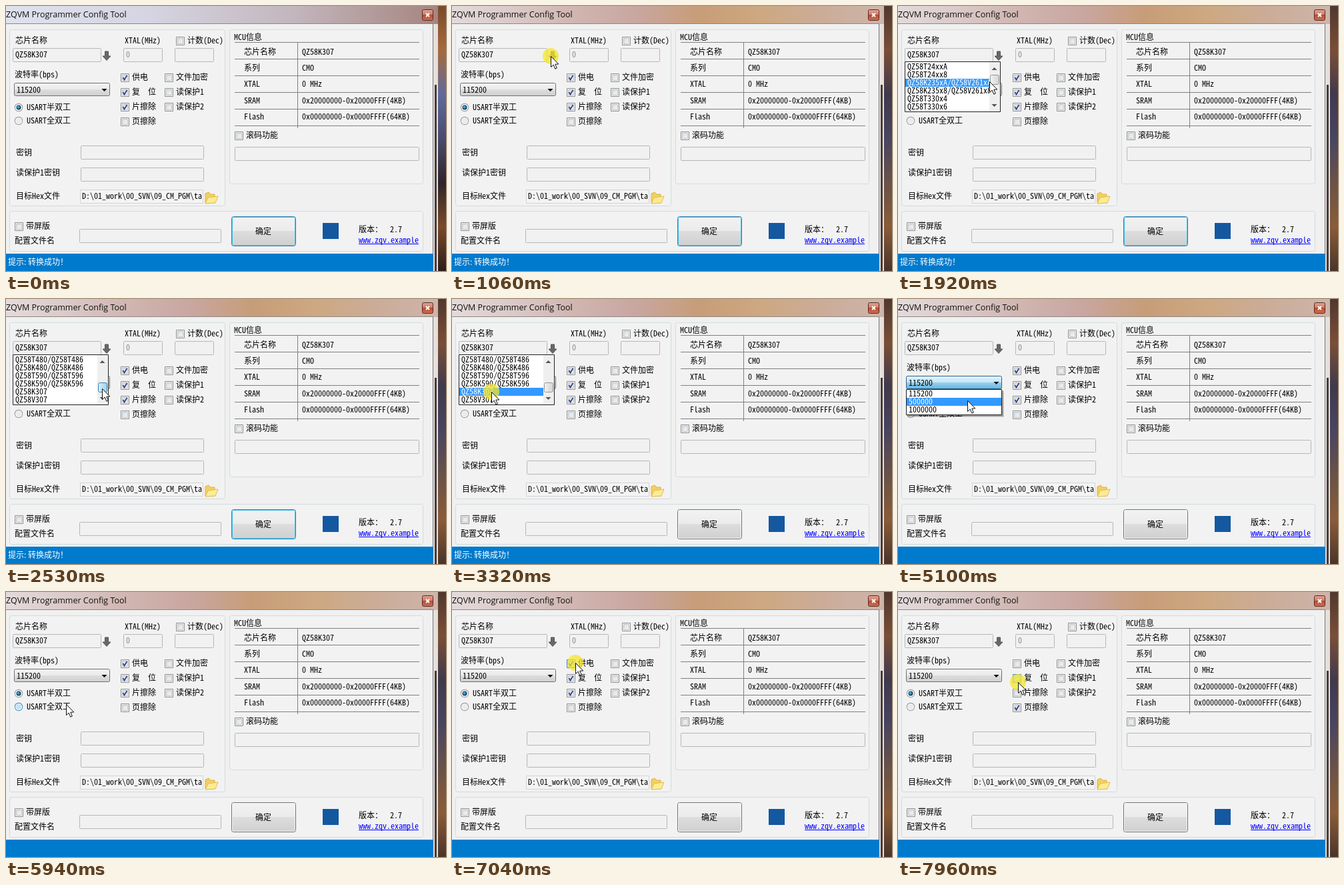
Recreate the animation shown at these times as an HTML page with a canvas. Size 660 by 397 pixels, loop 8000 ms.

```html
<!DOCTYPE html>
<html lang="zh-CN">
<head>
<meta charset="utf-8">
<style>
html, body { margin: 0; width: 660px; height: 397px; overflow: hidden; background: #f0f0f0 }
canvas { display: block }
</style>
</head>
<body>
<canvas id="stage" width="660" height="397"></canvas>
<script>
const ctx = document.getElementById('stage').getContext('2d');
const LOOP = 8000, PRESS = 150, ROW = 12;
const MONO = '12px "Noto Sans Mono CJK SC", "Noto Sans CJK SC", monospace';
const CHIP = 'QZ58K307';
const CHIPS = [
  ...['A', '8'].map(s => `QZ58T24xx${s}`),
  ...['A', '8'].map(s => `QZ58K235x${s}/QZ58V261x${s}`),
  ...['T', 'K'].flatMap(k => ['x4', 'x6', ''].map(s => `QZ58${k}330${s}`)),
  ...['48', '59'].flatMap(n => ['T', 'K'].map(k => `QZ58${k}${n}0/QZ58${k}${n}6`)),
  CHIP, 'QZ58V307'];
const RATES = ['115200', '500000', '1000000'];

// Pointer stops; travel time follows from the distance
const STOPS = [
  { at: 360, x: 330, y: 410 },
  { at: 980, x: 148, y: 75, press: 1060 },
  { at: 1920, x: 137, y: 113 },
  { at: 2100, x: 144, y: 113, press: 2230 },
  { at: 2530, x: 144, y: 134, press: 2380 },
  { at: 3240, x: 59, y: 139, press: 3310 },
  { at: 4070, x: 95, y: 127, press: 4240 },
  { at: 5090, x: 104, y: 152 },
  { at: 5400, x: 105, y: 138, press: 5560 },
  { at: 5950, x: 90, y: 168 },
  { at: 6260, x: 88, y: 154 },
  { at: 6880, x: 185, y: 106, press: 7040 },
  { at: 7420, x: 178, y: 127, press: 7570 },
  { at: 7730, x: 178, y: 152, press: 7880 },
  { at: 7960, x: 180, y: 135 }];
const CHIPS_OPEN = 1220, CHIPS_CLOSE = 3450, RATES_OPEN = 4390, RATES_CLOSE = 5710;

const within = (t, a, b) => t >= a && t < b;
const clamp = (v, lo = 0, hi = 1) => Math.min(hi, Math.max(lo, v));

function pointerAt(t) {
  if (t < STOPS[0].at) return [-50, -50];
  const i = STOPS.findIndex(s => s.at > t);
  if (i < 0) return [STOPS.at(-1).x, STOPS.at(-1).y];
  const a = STOPS[i - 1], b = STOPS[i], dx = b.x - a.x, dy = b.y - a.y;
  const travel = Math.min(45 * Math.sqrt(Math.hypot(dx, dy)), .4 * (b.at - a.at));
  const u = clamp(1 - (b.at - t) / travel), k = u * u * (3 - 2 * u);
  return [Math.round(a.x + dx * k), Math.round(a.y + dy * k)];
}

function gradient(x0, y0, x1, y1, colors) {
  const g = ctx.createLinearGradient(x0, y0, x1, y1);
  colors.forEach((c, i) => g.addColorStop(i / (colors.length - 1), c));
  return g;
}
// Button face with a hard step in the middle
function glossy(y0, y1, colors) {
  const g = ctx.createLinearGradient(0, y0, 0, y1);
  colors.forEach((c, i) => g.addColorStop([0, .5, .5, 1][i], c));
  return g;
}
function fill(x, y, w, h, color) {
  ctx.fillStyle = color;
  ctx.fillRect(x, y, w, h);
}
// Crisp one-pixel frame between two corners
function frame(x0, y0, x1, y1, stroke, back, r = 0) {
  ctx.beginPath();
  ctx.roundRect(x0 + .5, y0 + .5, x1 - x0 - 1, y1 - y0 - 1, r);
  if (back) { ctx.fillStyle = back; ctx.fill(); }
  ctx.lineWidth = 1;
  ctx.strokeStyle = stroke;
  ctx.stroke();
}
function shape(points, color, outline) {
  ctx.beginPath();
  points.forEach(([x, y]) => ctx.lineTo(x, y));
  ctx.closePath();
  ctx.fillStyle = color;
  ctx.fill();
  if (outline) { ctx.lineWidth = 1; ctx.strokeStyle = outline; ctx.stroke(); }
}
function disc(x, y, r, color) {
  ctx.beginPath();
  ctx.arc(x, y, r, 0, 7);
  ctx.fillStyle = color;
  ctx.fill();
}
// y is the middle of the line
function text(s, x, y, color = '#000', font = MONO) {
  ctx.font = font;
  ctx.fillStyle = color;
  ctx.fillText(s, x, y + 4);
}
const input = (x0, y0, x1, y1) => frame(x0, y0, x1, y1, '#b4b7ba', '#f1f1f1', 1);
const panel = (x0, y0, x1, y1) => frame(x0, y0, x1, y1, '#d3dbe0', '#f2f2f2', 3);
const triangle = (x, y, dir, color) =>
  shape([[x - 4, y - 2 * dir], [x + 4, y - 2 * dir], [x, y + 2 * dir]], color);

function checkbox(x, y, label, on, hot) {
  frame(x, y, x + 13, y + 13, hot ? '#3c7fb1' : '#8e8f8f', '#f4f4f4');
  frame(x + 2, y + 2, x + 11, y + 11, hot ? '#7ac4ea' : '#bcc1c6',
    gradient(x, y, x + 11, y + 11, hot ? ['#b5e0f8', '#e4f5fe'] : ['#d3d7db', '#f6f6f6']));
  if (on) {
    ctx.beginPath();
    ctx.moveTo(x + 3.5, y + 6);
    ctx.lineTo(x + 5.5, y + 9.5);
    ctx.lineTo(x + 9.5, y + 3);
    ctx.lineWidth = 1.8;
    ctx.strokeStyle = '#33428c';
    ctx.stroke();
  }
  text(label, x + 17, y + 6);
}
function radio(y, label, on, hot) {
  disc(19, y, 6.2, hot ? '#3c7fb1' : '#8e8f8f');
  disc(19, y, 5.3, '#f8f8f8');
  disc(19, y, 4.2, hot ? '#bfe5f9' : '#e9ebec');
  if (on) { disc(19, y, 3.5, '#1b4a6b'); disc(18.5, y - .5, 2, '#39a5d6'); }
  text(label, 31, y);
}

function desktop(title, side, alpha) {
  ctx.globalAlpha = alpha;
  fill(0, 0, 648, 27, gradient(0, 0, 648, 0, title));
  fill(648, 0, 12, 397, gradient(0, 0, 0, 397, side));
  ctx.globalAlpha = 1;
}
function titleBar(t) {
  desktop(['#e4dadb', '#dac9c8', '#d0b5b0', '#c9a6a0', '#c79d78', '#cda881', '#cbac98', '#cdb5ab'],
    ['#50382e', '#7a4e38', '#3f3a4c', '#4a4560', '#6a5348', '#8a5c38', '#4a342a'], 1);
  desktop(['#dfe2ee', '#d5d4e2', '#c3b6bd', '#a58580'],
    ['#7a4a2c', '#a56a3c', '#5f6b9c', '#4a4c6e', '#30242a', '#7b4a2a', '#2c1d1b'],
    clamp(1 - (t - 360) / 700));
  fill(641, 27, 7, 370, '#e6dfdb');
  fill(643, 118, 3, 279, '#453c3c');
  fill(0, 26, 641, 1, '#8b8886');
  fill(640, 27, 1, 370, '#77757a');
  text('ZQVM Programmer Config Tool', 0, 13, '#111', '12.5px "Open Sans", "Noto Sans", sans-serif');
  frame(624, 5, 641, 22, '#5b2a22', glossy(5, 22, ['#e0a596', '#cf7a66', '#bb4a30', '#cf7254']), 2);
  ctx.beginPath();
  ctx.moveTo(630, 11); ctx.lineTo(635, 16);
  ctx.moveTo(635, 11); ctx.lineTo(630, 16);
  ctx.lineWidth = 2;
  ctx.strokeStyle = '#fff';
  ctx.stroke();
}

const PLAIN = ['#f2f2f2', '#ebebeb', '#dddddd', '#cfcfcf'];
const HOT = ['#eaf6fd', '#d9f0fc', '#bee6fd', '#a7d9f5'];
const PRESSED = ['#e5f4fc', '#c4e5f6', '#98d1ef', '#68b3db'];

function settings(t, mx, my) {
  const listOpen = within(t, CHIPS_OPEN, CHIPS_CLOSE), ratesOpen = within(t, RATES_OPEN, RATES_CLOSE);
  const over = (x0, y0, x1, y1) =>
    !listOpen && !ratesOpen && mx >= x0 && mx < x1 && my >= y0 && my < y1;
  panel(5, 35, 329, 300);
  text('芯片名称', 14, 52);
  input(10, 63, 143, 84);
  text(CHIP, 14, 73);
  shape([[148.5, 68], [153.5, 68], [153.5, 75], [157, 75], [151, 81.5], [145, 75], [148.5, 75]], '#686868', '#555');
  text('XTAL(MHz)', 178, 52);
  input(176, 63, 235, 84);
  text('0', 180, 73, '#888');
  checkbox(255, 46, '计数(Dec)');
  input(253, 63, 312, 84);

  text('波特率(bps)', 13, 103);
  const hot = over(12, 115, 156, 135);
  frame(12, 115, 156, 135, ratesOpen ? '#2c628b' : hot ? '#3c7fb1' : '#707070',
    glossy(115, 135, ratesOpen ? PRESSED : hot ? HOT : PLAIN), 2);
  text('115200', 16, 126);
  triangle(147.5, 126, 1, '#000');
  ['USART半双工', 'USART全双工'].forEach((label, i) => {
    const y = 152 + 20 * i;
    radio(y, label, i === 0, over(13, y - 7, 97, y + 7));
  });

  const erasePages = t >= 7880;
  const states = [t < 7040 + PRESS, t < 7650, !erasePages, erasePages];
  ['供电', '复　位', '片擦除', '页擦除'].forEach((label, i) => {
    const y = 101 + 22 * i;
    checkbox(172, y, label, states[i], over(172, y - 2, 230, y + 15));
  });
  ['文件加密', '读保护1', '读保护2'].forEach((label, i) => checkbox(238, 101 + 22 * i, label));

  text('密钥', 15, 220);
  input(112, 209, 297, 230);
  text('读保护1密钥', 15, 250);
  input(112, 242, 297, 263);
  text('目标Hex文件', 15, 285);
  frame(111, 275, 296, 296, '#d0d3d6', '#f4f4f4');
  text('D:\\01_work\\00_SVN\\09_CM_PGM\\ta', 114, 285);
  shape([[299, 295], [299, 281], [304, 279], [307, 282], [313, 282], [313, 295]], '#f3cf62', '#dcb347');
  shape([[299, 296], [303, 287], [318, 285], [314, 295]], '#fdeb95', '#e2bc50');
}

function chipInfo() {
  panel(335, 35, 626, 267);
  text('MCU信息', 342, 47);
  for (let i = 0; i < 6; i++) fill(343, Math.round(54.2 + 24.9 * i), 277, 1, '#808080');
  fill(437, 55, 1, 128, '#808080');
  const info = { '芯片名称': CHIP, '系列': 'CMO', 'XTAL': '0 MHz',
    'SRAM': '0x20000000-0x20000FFF(4KB)', 'Flash': '0x00000000-0x0000FFFF(64KB)' };
  Object.entries(info).forEach(([key, value], i) => {
    const y = Math.round(69 + 24.2 * i);
    text(key, 357, y);
    text(value, 444, y);
  });
  checkbox(343, 188, '滚码功能');
  input(343, 211, 620, 232);
}

function footer(t) {
  panel(5, 307, 626, 368);
  checkbox(13, 324, '带屏版');
  text('配置文件名', 13, 352);
  input(110, 334, 323, 355);
  const glow = t < 3280;
  frame(338, 315, 435, 360, glow ? '#3c7fb1' : '#707070', glossy(315, 360, PLAIN), 3);
  frame(339, 316, 434, 359, glow ? '#48c4ec' : '#f8f8f8', null, 2);
  text('确定', 374, 338);
  fill(475, 325, 24, 24, '#1458a0');
  text('版本：', 529, 335);
  text('2.7', 576, 335);
  text('www.zqv.example', 529, 351, '#00f');
  fill(529, 356, 90, 1, '#00f');
  fill(0, 371, 641, 26, '#007acc');
  if (t < CHIPS_CLOSE) text('提示: 转换成功！', 3, 384, '#fff', '12px "Noto Sans CJK SC", sans-serif');
}

function rows(items, x, top, width, selected) {
  ctx.save();
  ctx.beginPath();
  ctx.rect(x, top, width, items.length * ROW);
  ctx.clip();
  items.forEach((item, i) => {
    if (i === selected) fill(x, top + ROW * i, width, ROW, '#3399ff');
    text(item, x + 3, top + 6 + ROW * i, i === selected ? '#fff' : '#000');
  });
  ctx.restore();
}
function chipList(t, my) {
  const scroll = t < 2230 ? 0 : Math.round(10 * clamp((my - 113) / 21));
  const selected = t < 1850 ? -1 : t < 2760 ? 2 : CHIPS.indexOf(CHIP);
  frame(10, 83, 154, 159, '#222', '#fff');
  rows(CHIPS.slice(scroll, scroll + 6), 11, 85, 126, selected - scroll);
  fill(137, 84, 16, 74, '#efefef');
  triangle(144.5, 94, -1, '#555');
  triangle(144.5, 149, 1, '#555');
  const y = 103 + Math.round(scroll * 2.2), held = within(t, 2080, 2600);
  frame(138, y, 152, y + 15, held ? '#3c7fb1' : '#979797',
    gradient(138, 0, 152, 0, held ? ['#d9f0fc', '#98d1ef'] : ['#f5f5f5', '#d2d2d2']), 2);
}
function rateList(my) {
  fill(15, 138, 144, 39, 'rgba(0,0,0,.13)');
  fill(14, 137, 144, 39, 'rgba(0,0,0,.25)');
  frame(12, 135, 156, 174, '#222', '#fff');
  rows(RATES, 13, 136, 142, clamp(Math.floor((my - 136) / ROW), 0, 2));
}

function pointer(t, x, y) {
  if (STOPS.some(s => within(t, s.press, s.press + PRESS))) disc(x, y, 12, 'rgba(245,230,40,.75)');
  const arrow = [[0, 0], [0, 16], [3.7, 12.6], [6.3, 18.7], [8.8, 17.6], [6.3, 11.7], [11.3, 11.5]];
  shape(arrow.map(([dx, dy]) => [x + dx + .5, y + dy + .5]), '#fff', '#111');
}

function draw(t) {
  const [mx, my] = pointerAt(t);
  fill(0, 0, 660, 397, '#f0f0f0');
  titleBar(t);
  settings(t, mx, my);
  chipInfo();
  footer(t);
  if (within(t, CHIPS_OPEN, CHIPS_CLOSE)) chipList(t, my);
  if (within(t, RATES_OPEN, RATES_CLOSE)) rateList(my);
  pointer(t, mx, my);
}

const start = performance.now();
function tick() {
  draw((performance.now() - start) % LOOP);
  requestAnimationFrame(tick);
}
tick();
</script>
</body>
</html>
```
